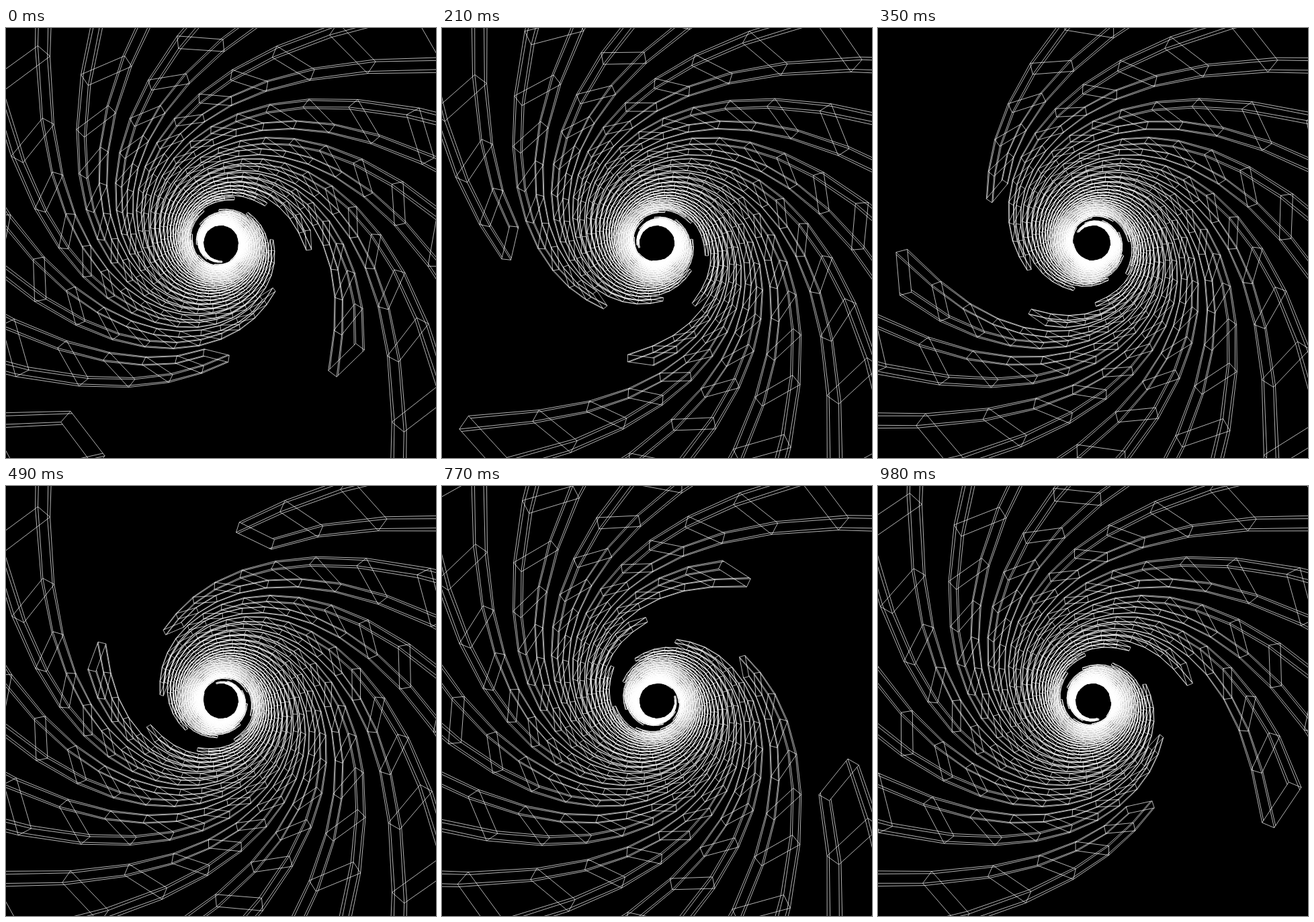
An HTML page with a canvas that plays this animation: 640 by 640 pixels, repeating every 1.05 s.

```html
<!DOCTYPE html>
<html>
<head>
<meta charset="utf-8">
<title>Spiral tunnel</title>
<style>
html, body { margin: 0; width: 100%; height: 100%; overflow: hidden; background: #000; }
canvas { display: block; width: 640px; height: 640px; }
</style>
</head>
<body>
<canvas id="stage" width="640" height="640"></canvas>
<script>
const ctx = document.getElementById('stage').getContext('2d');
const SIZE = 640, MID = SIZE / 2;
const LOOP = 1050, FRAMES = 15;
const RAD = Math.PI / 180;

const ARMS = 12;
const STEP = 12.13 * RAD;         // turn between two ribs
const PERIOD = 887.8 * RAD;       // spacing of beams along one helix
const RIBS = 60;                  // ribs in a beam, the rest is gap
const DELAY = 75 * RAD;           // shift from arm to arm
const START = 290.6 * RAD;
const TURN = 211 * RAD;

const FOCAL = 772.5;
const PITCH = 14 / (2 * Math.PI); // depth per radian, tube radius is 1
const HALF_W = 0.1237, HALF_H = 0.031;
const INSET = 0.89;               // second rail beside each corner
const NEAR = 0.2, FAR = 12.93;    // visible range of the helix angle

const CORNERS = [[1, -1], [1, 1], [-1, 1], [-1, -1]];
const RAILS = CORNERS.concat(CORNERS.map(([u, v]) => [u, v * INSET]));

function helix(base, a) {
  return [Math.cos(base - a), Math.sin(base - a), PITCH * a];
}

// Projected points of the beam's cross-section at rib k: corners, then inset rails
function section(base, first, k) {
  const at = i => helix(base, first + i * STEP);
  const p = at(k);
  const front = at(Math.max(k - 1, 0));
  const back = at(Math.min(k + 1, RIBS - 1));
  const tx = front[0] - back[0], ty = front[1] - back[1], tz = back[2] - front[2];
  const flat = Math.hypot(tx, ty), len = Math.hypot(flat, tz);
  const dx = tx / flat, dy = ty / flat;
  const across = tz / len, deep = flat / len;
  return RAILS.map(([u, v]) => {
    const h = u * HALF_H, w = v * HALF_W;
    const scale = FOCAL / (p[2] + w * deep);
    return [
      MID + scale * (p[0] + h * dy + w * across * dx),
      MID + scale * (p[1] - h * dx + w * across * dy)
    ];
  });
}

function drawBeam(base, first) {
  let prev = null;
  for (let k = 0; k < RIBS; k++) {
    const a = first + k * STEP;
    if (a < NEAR) continue;
    if (a > FAR) break;
    const points = section(base, first, k);
    ctx.beginPath();
    for (let i = 0; i < CORNERS.length; i++) ctx.lineTo(...points[i]);
    ctx.closePath();
    if (prev) {
      points.forEach((point, i) => {
        ctx.moveTo(...prev[i]);
        ctx.lineTo(...point);
      });
    }
    ctx.stroke();
    prev = points;
  }
}

function draw(time) {
  const frame = Math.floor((time % LOOP) / (LOOP / FRAMES));
  ctx.fillStyle = '#000';
  ctx.fillRect(0, 0, SIZE, SIZE);
  ctx.strokeStyle = '#fff';
  ctx.lineWidth = 0.7;
  for (let j = 0; j < ARMS; j++) {
    const shift = START + j * DELAY - PERIOD * frame / FRAMES;
    const first = ((shift % PERIOD) + PERIOD) % PERIOD;
    const base = TURN + j * 2 * Math.PI / ARMS;
    drawBeam(base, first);
    drawBeam(base, first - PERIOD);
  }
}

const begin = performance.now();
function tick() {
  draw(performance.now() - begin);
  requestAnimationFrame(tick);
}
tick();
</script>
</body>
</html>
```
